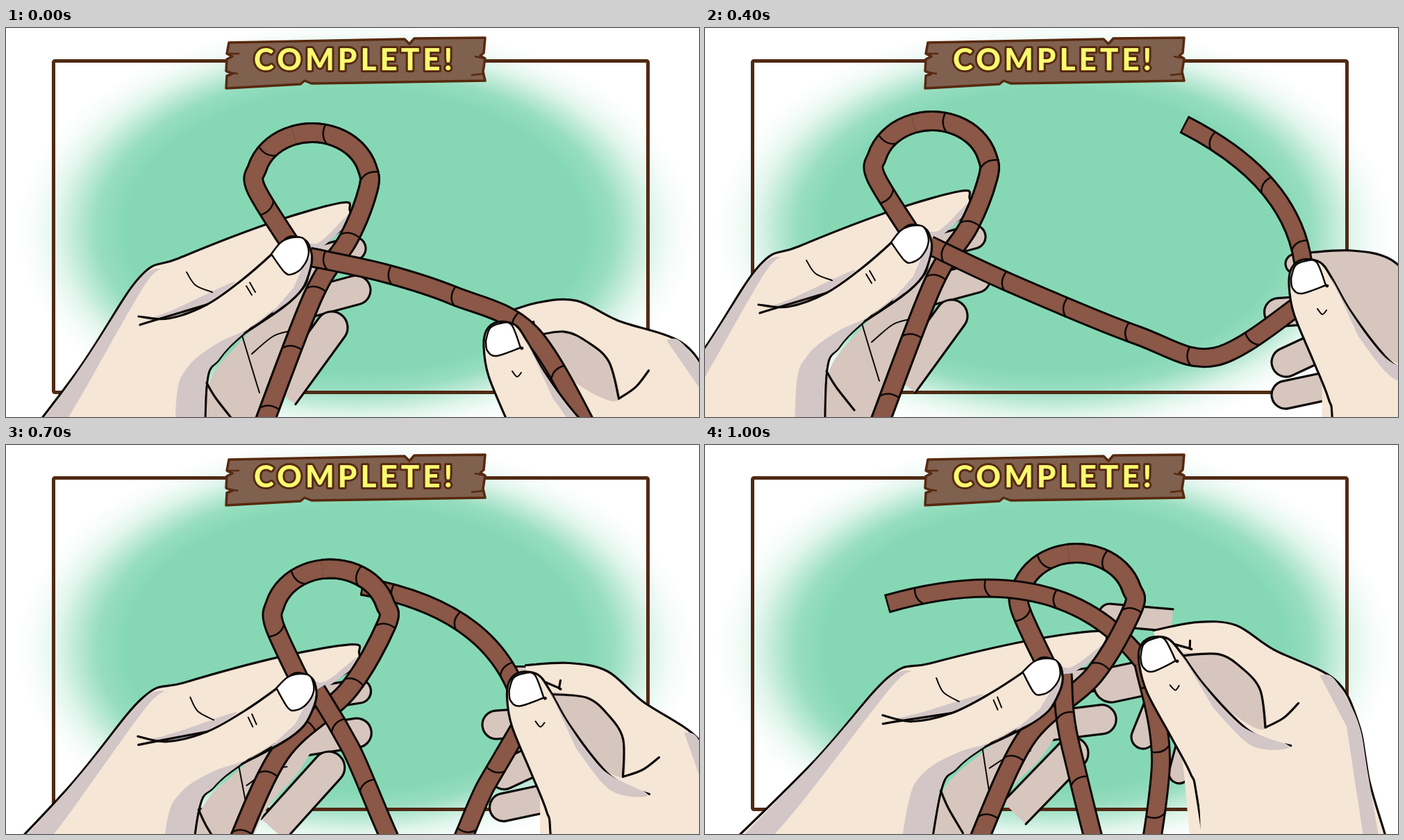
An HTML page for the animation above (1.3 s loop, 998x561 px).

```html
<!DOCTYPE html>
<html lang="en">
<head>
<meta charset="utf-8">
<title>Knot tying</title>
<style>
html, body { margin: 0; width: 100%; height: 100%; overflow: hidden; background: #fff; }
svg { display: block; width: 100%; height: 100%; }
path { fill: none; stroke-linejoin: round; }
.skin, .dark, .line, .nail, .thin { stroke: #0d0908; stroke-width: 3.2; stroke-linecap: round; }
.thin { stroke-width: 2; }
.skin, .flesh { fill: #f5e6d6; }
.dark, .dim { fill: #d6c6be; }
.shade { fill: #d2c6c7; }
.nail { fill: #fff; stroke-width: 2.5; }
.edge { stroke: #0d0908; }
.cord { stroke: #8b5746; }
.band { stroke: #0d0908; stroke-width: 2.5; stroke-linecap: round; }
.plank { fill: #80604f; stroke: #57290f; stroke-width: 3.5; }
.crack { stroke: #57290f; stroke-width: 2.5; }
text { font: 800 44px Lato, "Open Sans", sans-serif; letter-spacing: 5px; fill: #f9fb70;
  stroke: #57290f; stroke-width: 6px; stroke-linejoin: round; paint-order: stroke; }
</style>
</head>
<body>
<svg viewBox="0 0 998 561" preserveAspectRatio="none">
  <defs>
    <radialGradient id="glow">
      <stop offset=".68" stop-color="#86d8b5"/>
      <stop offset=".76" stop-color="#86d8b5" stop-opacity=".86"/>
      <stop offset=".82" stop-color="#86d8b5" stop-opacity=".56"/>
      <stop offset=".88" stop-color="#86d8b5" stop-opacity=".25"/>
      <stop offset=".94" stop-color="#86d8b5" stop-opacity=".08"/>
      <stop offset="1" stop-color="#86d8b5" stop-opacity="0"/>
    </radialGradient>
  </defs>
  <ellipse cx="503" cy="292" rx="488" ry="302" fill="url(#glow)"/>
  <rect x="68.500" y="47.500" width="856" height="478" rx="2" fill="none" stroke="#502a13" stroke-width="5"/>
  <g id="scene"></g>
  <path class="plank" d="M321 21L574 16L581 23L588 15L690 14L688 36L683 40L690 44L687 63L690 76L440 80L430 76L424 81L317 87L318 69L326 66L317 62L318 45L326 41L318 37Z"/>
  <path class="crack" d="M318 37h18M317 63l17 3M690 44l-15 -3M688 66l-18 2"/>
  <text x="357" y="61">COMPLETE!</text>
</svg>
<script>
const RAD = Math.PI / 180;
const mix = (a, b, k) => Array.isArray(a) ? a.map((v, i) => mix(v, b[i], k)) : a + (b - a) * k;
const add = (a, b) => [a[0] + b[0], a[1] + b[1]];
const polar = (deg, length) => [Math.cos(deg * RAD) * length, Math.sin(deg * RAD) * length];
const points = text => text.split(" ").map(pair => pair.split(",").map(Number));

// Catmull-Rom curve through the points.
function smooth(pts) {
  let d = `M${pts[0]}`;
  for (let i = 0; i < pts.length - 1; i++) {
    const a = pts[i - 1] || pts[i], b = pts[i], c = pts[i + 1], e = pts[i + 2] || c;
    const near = b.map((v, n) => v + (c[n] - a[n]) / 6), far = c.map((v, n) => v - (e[n] - b[n]) / 6);
    d += `C${near} ${far} ${c}`;
  }
  return d;
}

const shape = (kind, text) => `<path class="${kind}" d="${smooth(points(text))}"/>`;
const place = ([x, y], turn, content) => `<g transform="translate(${x} ${y}) rotate(${turn})">${content}</g>`;

// A finger is a capsule: tip, direction towards the palm, width.
function finger([x, y, deg, width, kind = "dark"], reach) {
  const r = width / 2;
  return `<g transform="translate(${x} ${y}) rotate(${deg})">` +
    `<path class="${kind}" d="M${reach} ${-r}H0A${r} ${r} 0 0 0 0 ${r}H${reach}"/></g>`;
}
const fingers = (list, reach) => list.map(f => finger(f, reach)).join("");

// Both hands are drawn around the middle of the thumbnail.
const LEFT_BACK =
  fingers([[92, -10, 165, 34], [95, 50, 165, 42], [60, 104, 126, 46]], 120) +
  shape("dim", "-125,372 -122,202 -65,117 30,22 60,10 20,110 -30,190 -75,372") +
  shape("thin", "-70,112 -55,162 -44,198") +
  shape("thin", "-55,142 -25,117 0,109") +
  shape("skin", "-464,372 -310,172 -218,33 -160,4 -25,-48 74,-76 86,-66 82,-44 30,-2 18,48 -65,112 -102,150 -120,190 -123,372") +
  shape("shade", "-455,372 -310,174 -218,36 -182,22 -210,44 -320,235 -410,372") +
  shape("shade", "-165,372 -164,212 -148,162 -105,127 -50,100 18,46 -65,111 -102,149 -122,190 -125,372") +
  shape("shade", "-20,-46 10,-28 40,-18 83,-58 80,-43 30,-3 -10,-18");

const LEFT_THUMB =
  shape("flesh", "-140,77 -70,37 -25,-3 -3,-26 22,-22 31,-3 18,48 -10,72 -65,92") +
  shape("shade", "18,17 30,2 29,21 15,50 -25,83 5,47") +
  shape("shade", "-205,92 -165,77 -80,38 -120,69 -165,90") +
  shape("line", "-218,88 -175,91 -120,71 -70,36 -25,-3 -3,-26 22,-22 31,-3 30,17 18,48 -10,75 -65,112") +
  shape("line", "-216,100 -190,92 -120,71") +
  shape("thin", "-149,24 -136,43 -112,53") +
  shape("thin", "-63,44 -55,57") + shape("thin", "-58,39 -50,53") +
  shape("line", "-120,184 -106,207 -80,240") +
  shape("nail", "-27,-2 -13,-19 4,-26 20,-24 27,-4 18,17 3,27 -8,24 -27,-2");

const RIGHT_OUTLINE = "0,-36 63,-39 118,-27 168,16 248,70 273,135 277,215 281,445 45,445 30,150 0,60";
const RIGHT_BACK = {
  none: "",
  dark: shape("dark", RIGHT_OUTLINE),
  skin: shape("skin", RIGHT_OUTLINE) +
    shape("shade", "228,61 248,70 273,135 277,215 281,445 262,445 256,140") +
    shape("dim", "31,1 88,11 118,35 140,70 141,125 110,112 53,50") +
    shape("line", "38,6 88,11 118,35 140,70 140,125") +
    shape("line", "13,-18 48,-3 48,-3 50,-14") +
    shape("line", "140,125 168,115 192,97")
};

const RIGHT_THUMB =
  shape("flesh", "35,1 63,50 111,113 178,150 240,260 250,445 45,445 20,150") +
  shape("skin", "178,150 143,137 111,113 63,50 35,1 18,-22 -7,-26 -23,-14 -27,10 -20,52 8,120 30,175 36,215 45,445") +
  shape("flesh", "140,140 180,155 240,260 250,445 47,445 38,215 35,180") +
  shape("shade", "34,0 63,52 111,115 176,151 123,145 73,85") +
  shape("thin", "14,45 21,53 27,47") +
  shape("nail", "-24,1 -18,-17 -3,-24 13,-22 26,11 26,11 -9,23 -22,15 -24,1");

const CURLED = [[-18, -20, 0, 28], [-32, 169, -12, 40], [-31, 122, -25, 42], [-42, 50, -4, 41]];
const GRIPS = {
  low: { thumb: 0, turn: -15, back: "skin", fingers: [], reach: 0 },
  regrip: { thumb: -17, turn: 0, back: "none", reach: 190,
    fingers: [[-45, 80, 0, 42], [-43, 42, -4, 42], [71, -66, 11, 46, "skin"]] },
  hold: { thumb: 0, turn: 0, back: "dark", fingers: CURLED, reach: 90 },
  feed: { thumb: 0, turn: 0, back: "skin", fingers: CURLED, reach: 90 },
  pull: { thumb: -6, turn: -8, back: "skin", reach: 90,
    fingers: [[-68, -58, 5, 32], [-66, 43, -12, 50], [32, 170, -75, 30], [-20, 118, -68, 34]] }
};

// at: loop centre, right: right thumbnail, lead: cord to the right hand, tip: free end.
const POSES = [
  { at: [441, 220], turn: 0, pinch: 0, right: [715, 450], grip: "low", lead: points("547,354 645,386 755,440 845,590") },
  { at: [449, 232], turn: 0, pinch: 0, right: [847, 548], grip: "low", lead: points("555,368 657,402 785,468 860,545") },
  { at: [460, 245], turn: 4, pinch: 0, right: [870, 470], grip: "regrip", tip: [752, 228], lead: points("570,407 728,487 815,532 900,480") },
  { at: [327, 203], turn: 0, pinch: 0, right: [868, 360], grip: "hold", tip: [690, 139], lead: points("440,368 622,443 735,474 862,395") },
  { at: [466, 246], turn: 6, pinch: 1, right: [807, 355], grip: "feed", tip: [580, 186], lead: points("496,436 640,625 738,490 805,395") },
  { at: [468, 249], turn: 6, pinch: 1, right: [690, 352], grip: "feed", tip: [445, 221], lead: points("495,435 565,660 647,488 690,395") },
  { at: [535, 225], turn: 8, pinch: 1, right: [651, 303], grip: "pull", tip: [262, 229], lead: points("528,440 605,690 656,470 632,315") }
];
// One entry per step; a half lies midway between two poses.
const STEPS = [0, 1, 1.5, 2, 3, 3.5, 4, 4.5, 5, 5.5, 6];
const STEP_MS = 100, LOOP_MS = 1300;

function poseAt(position) {
  const from = POSES[Math.floor(position)], to = POSES[Math.ceil(position)], pose = {};
  for (const key in to) {
    const blend = from[key] !== undefined && key !== "grip";
    pose[key] = blend ? mix(from[key], to[key], position % 1) : to[key];
  }
  return pose;
}

// The loop is an elliptic arc between the thumb and the crossing tail.
function loopPath({ at, pinch }) {
  const local = (open, closed) => add(at, mix(open, closed, pinch));
  const arc = Array.from({ length: 9 }, (_, i) => {
    const angle = (170 + i * 25) * RAD;
    return add(at, [82 * Math.cos(angle), 69 * Math.sin(angle)]);
  });
  return smooth([local([-30, 94], [-45, 90]), ...arc,
    local([53, 83], [25, 107]), local([2, 165], [-72, 197]), local([-75, 365], [-143, 350])]);
}

// The free end bows in one arch from the right hand to its tip.
function freePath({ lead, tip }) {
  const start = lead[lead.length - 1], dx = start[0] - tip[0], dy = start[1] - tip[1];
  const bow = add(start, polar(Math.atan2(-dy, -dx) / RAD + 40, Math.hypot(dx, dy) * .52));
  return `M${tip}Q${bow} ${start}`;
}

function cord(d, width, extra = "") {
  return `<path class="edge" d="${d}" stroke-width="${width}" ${extra}/>` +
    `<path class="cord" d="${d}" stroke-width="${width - 6}" ${extra}/>`;
}

const probe = document.createElementNS("http://www.w3.org/2000/svg", "path");

// Curved marks at even distances along a cord.
function twists(d, first, gap, width, bulge = 8) {
  probe.setAttribute("d", d);
  const half = width / 2 - 1.5, total = probe.getTotalLength();
  let marks = "";
  for (let s = first; s < total; s += gap) {
    const p = probe.getPointAtLength(s), q = probe.getPointAtLength(s + 1);
    marks += `<path class="band" transform="translate(${p.x} ${p.y}) rotate(${Math.atan2(q.y - p.y, q.x - p.x) / RAD})" ` +
      `d="M${bulge / 2} ${half}Q${-bulge} ${half / 3} ${-bulge / 2} ${-half}"/>`;
  }
  return marks;
}

function draw(pose) {
  const { at, turn, pinch, right, lead, tip } = pose, grip = GRIPS[pose.grip];
  const nail = add(at, mix([-32, 108], [-51, 108], pinch));
  const loop = loopPath(pose);
  const strand = smooth([add(at, mix([-4, 110], [-20, 106], pinch)), ...lead]);
  const free = tip ? freePath(pose) : "";
  const end = free && cord(free, 28) + twists(free, 48, 100, 28) + twists(free, 1, Infinity, 28, 0);
  return place(nail, turn, LEFT_BACK) +
    place(right, 0, fingers(grip.fingers, grip.reach)) + place(right, grip.turn, RIGHT_BACK[grip.back]) +
    cord(loop, 30) + end +
    cord(loop, 30, 'pathLength="1" stroke-dasharray="0 .27 1 0"') +
    twists(loop, 65 + 12 * pinch, 92, 30) +
    cord(strand, 29) + twists(strand, 25 + 35 * pinch, 96, 29) +
    place(nail, turn, LEFT_THUMB) + place(right, grip.thumb, RIGHT_THUMB);
}

const scene = document.getElementById("scene");
const start = performance.now();
let shown = -1;

function update() {
  const time = (performance.now() - start) % LOOP_MS;
  const step = Math.min(Math.floor(time / STEP_MS), STEPS.length - 1);
  if (step !== shown) scene.innerHTML = draw(poseAt(STEPS[shown = step]));
  requestAnimationFrame(update);
}
update();
</script>
</body>
</html>
```
